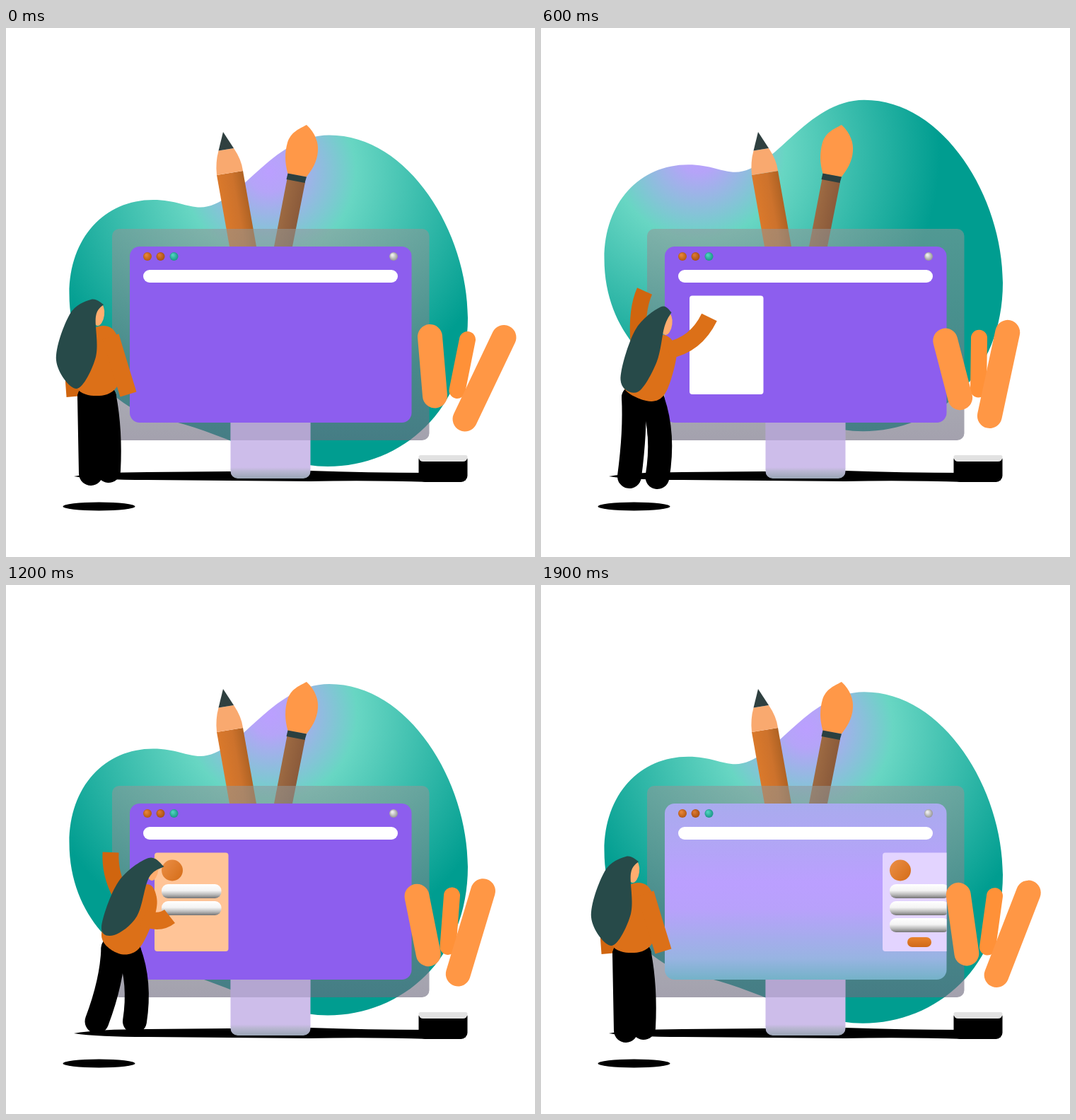
An HTML page with a canvas that plays this animation: 748x748 px, repeating every 2000 ms.

```html
<!DOCTYPE html>
<html lang="en">
<head>
<meta charset="utf-8">
<title>Building a page</title>
<style>
  html, body { margin: 0; width: 100%; height: 100%; overflow: hidden; background: #fff; }
  canvas { display: block; width: 100vw; height: 100vh; }
</style>
</head>
<body>
<canvas id="stage" width="748" height="748"></canvas>
<script>
const ctx = document.getElementById('stage').getContext('2d');
const LOOP = 2000, STEP = 100;

// Body poses: flat x,y lists
const stand = {
  hair: [138,391, 127,408, 127,465, 100,510, 71,470, 90,405, 120,384],
  body: [125,424, 150,425, 162,455, 158,505, 132,520, 100,508, 100,450],
  face: [131,405], back: [97,440, 93,480, 97,521], front: [148,436, 158,470, 173,518],
  legA: [118,522, 119,570, 120,630], legB: [139,522, 148,570, 145,626]
};
const reach = {
  hair: [187,420, 175,440, 163,485, 136,526, 111,507, 133,443, 170,409],
  body: [165,448, 184,454, 190,480, 172,530, 145,538, 111,510, 140,460],
  face: [177,434], back: [148,390, 135,410, 138,460], front: [176,463, 222,456, 243,415],
  legA: [127,528, 146,580, 130,641], legB: [156,535, 182,580, 171,641]
};
const lift = {
  hair: [182,384, 174,405, 164,460, 138,503, 114,488, 133,412, 168,380],
  body: [170,420, 187,429, 193,450, 178,505, 152,516, 120,498, 135,440],
  face: [178,402], back: [145,354, 134,388, 138,428], front: [184,448, 216,440, 233,403],
  legA: [135,517, 121,560, 120,627], legB: [160,519, 167,570, 158,629]
};
const place = {
  hair: [216,394, 197,410, 180,467, 150,496, 134,486, 158,418, 198,383],
  body: [195,425, 208,438, 206,468, 186,515, 158,521, 135,497, 155,445],
  face: [203,402], back: [146,370, 143,405, 159,437], front: [196,474, 221,468, 223,433],
  legA: [151,514, 150,560, 129,617], legB: [174,518, 189,560, 181,617]
};
const lower = {
  hair: [231,402, 207,418, 190,470, 156,494, 136,481, 160,421, 205,389],
  body: [200,422, 216,437, 215,465, 190,513, 160,521, 135,495, 155,445],
  face: [212,402], back: [150,386, 150,412, 164,436], front: [192,467, 213,492, 240,504],
  legA: [152,514, 150,560, 128,617], legB: [174,518, 192,565, 183,617]
};
const lean = {
  hair: [214,388, 199,410, 187,467, 158,499, 141,485, 157,417, 195,381],
  body: [195,420, 213,437, 212,468, 195,512, 163,521, 135,495, 145,440],
  face: [205,403], back: [150,386, 150,412, 160,436], front: [201,470, 205,490, 202,518],
  legA: [151,514, 142,560, 138,615], legB: [169,518, 171,560, 168,615]
};
const poses = [[0, stand], [100, stand], [400, reach], [800, lift], [1000, place],
  [1400, lower], [1600, lean], [1800, stand], [2000, stand]];

// Blob lift, and the gradient centre that drifts inside it
const lifts = [[0,0], [100,-6], [200,-20], [300,-36], [400,-45.5], [500,-49.5], [700,-50], [800,-46.5],
  [900,-36], [1000,-23.5], [1200,-11.5], [1400,-4.5], [1600,-1.8], [1800,-.5], [2000,0]];
const glowX = [[0,372], [400,226], [600,222], [800,246], [1000,318], [1400,430], [1600,400], [1900,375], [2000,372]];
const glowY = [[0,203], [400,176], [800,176], [1000,188], [1400,178], [1600,190], [1900,202], [2000,203]];

const lerp = (a, b, k) => a + (b - a) * k;
const mix = (a, b, k) => a.map((v, i) => lerp(v, b[i], k));

function span(keys, t) {
  let i = 1;
  while (i < keys.length - 1 && keys[i][0] < t) i++;
  const [t0, a] = keys[i - 1], [t1, b] = keys[i];
  return [a, b, (t - t0) / (t1 - t0)];
}
const at = (keys, t) => lerp(...span(keys, t));

function fill(style, path) {
  ctx.fillStyle = style;
  path ? ctx.fill(path) : ctx.fill();
}
function linear(x0, y0, x1, y1, ...stops) {
  const g = ctx.createLinearGradient(x0, y0, x1, y1);
  stops.forEach(([p, c]) => g.addColorStop(p, c));
  return g;
}
function box(x, y, w, h, r, style) {
  ctx.beginPath();
  ctx.roundRect(x, y, w, h, r);
  fill(style);
}
function oval(x, y, rx, ry, style, turn = 0) {
  ctx.beginPath();
  ctx.ellipse(x, y, rx, ry, turn, 0, 7);
  fill(style);
}
function poly(pts, style) {
  ctx.beginPath();
  for (let i = 0; i < pts.length; i += 2) ctx.lineTo(pts[i], pts[i + 1]);
  ctx.closePath();
  fill(style);
}
function ball(x, y, r, light, dark) {
  const g = ctx.createRadialGradient(x - r * .3, y - r * .35, r * .2, x, y, r * 1.1);
  g.addColorStop(0, light);
  g.addColorStop(1, dark);
  oval(x, y, r, r, g);
}
function limb(p, width, color, cap) {
  ctx.beginPath();
  ctx.moveTo(p[0], p[1]);
  if (p.length > 4) ctx.quadraticCurveTo(p[2], p[3], p[4], p[5]);
  else ctx.lineTo(p[2], p[3]);
  ctx.lineWidth = width;
  ctx.lineCap = cap;
  ctx.strokeStyle = color;
  ctx.stroke();
}
// Catmull-Rom outline; a sharp one has a corner at its first point
function outline(flat, sharp, style) {
  const n = flat.length / 2;
  const pt = i => {
    if (sharp) i = Math.max(0, Math.min(n, i));
    i = (i + n) % n;
    return [flat[2 * i], flat[2 * i + 1]];
  };
  ctx.beginPath();
  ctx.moveTo(...pt(0));
  for (let i = 0; i < n; i++) {
    const [a, b, c, d] = [pt(i - 1), pt(i), pt(i + 1), pt(i + 2)];
    ctx.bezierCurveTo(b[0] + (c[0] - a[0]) / 6, b[1] + (c[1] - a[1]) / 6,
      c[0] - (d[0] - b[0]) / 6, c[1] - (d[1] - b[1]) / 6, c[0], c[1]);
  }
  fill(style);
}

const blob = new Path2D('M89.5 376C89.5 296 140 243 208 243C240 243 255 253.5 275 253.5' +
  'C330 253.5 375 151.5 457 151.5C570 151.5 653 290 653 410C653 540 560 620 455 620' +
  'C380 620 300 568 222 553C165 545 89.5 482 89.5 376Z');
const floor = new Path2D('M96 634Q130 628 200 628L430 626Q510 629 600 629V642Q510 639 430 641L200 639Q130 639 96 634Z');
const wood = new Path2D('M300.5 173.5L322 170Q333 186 335 202L298 208Q296 190 300.5 173.5Z');
const bristle = new Path2D('M425 137C438 149 442 163 441 174C440 190 432 201 425 210.5L398.5 206' +
  'C394 190 394 176 398 162C403 147 414 143 425 137Z');
const peaks = new Path2D('M403 485Q400 485 401 482L423 418Q426 412 429 418L444 453L451 444Q454 440 456 445L471 482Q471 485 468 485Z');

function drawBlob(t) {
  const dy = at(lifts, t), x = at(glowX, t), y = at(glowY, t) - dy;
  const g = ctx.createRadialGradient(x, y, 0, x, y, 360);
  g.addColorStop(0, '#bb9fff');
  g.addColorStop(.08, '#b5a4f8');
  g.addColorStop(.34, '#68d6c3');
  g.addColorStop(.95, '#009d90');
  ctx.save();
  ctx.translate(0, dy);
  fill(g, blob);
  ctx.restore();
}

function drawTools() {
  poly([298,208, 335,202, 354,309, 316,309],
    linear(304, 260, 348, 252, [0, '#dc7a2b'], [.55, '#cd722c'], [1, '#a85f22']));
  fill('#f9a96f', wood);
  poly([307,147, 322,170, 300.5,173.5], '#2f4040');
  poly([397.5,213, 423,218, 405,309, 379,309], linear(388, 260, 416, 266, [0, '#9d6a42'], [1, '#89593a']));
  fill('#ff9848', bristle);
  poly([398.5,205.5, 425,210.5, 422.5,219, 396.5,214], '#2b4040');
}

function drawCard(t, themed) {
  if (t < 300) return;
  box(210, 378.5, 104.5, 139.5, 4, t < 700 ? '#fff' : themed ? '#e3d4ff' : '#ffc497');
  if (t >= 1000) oval(235, 403.5, 15, 15, linear(223, 395, 246, 412, [0, '#e88a40'], [1, '#d8721f']));
  for (let i = 0; i < 3; i++) {
    if (t < 1100 + i * 100) return;
    const y = 423 + i * 24;
    box(220, y, 84.5, 20, 9, linear(0, y, 0, y + 20, [0, '#fff'], [.45, '#f4f4f4'], [.75, '#b8b8b8'], [1, '#747474']));
  }
  if (t >= 1400) box(245, 498, 34, 14, 7, linear(0, 498, 0, 512, [0, '#e8822c'], [1, '#cf6918']));
}

function drawPanel() {
  box(349, 378.5, 185, 139.5, 3, linear(349, 0, 534, 0, [0, '#8465cf'], [.035, '#a783f0'], [1, '#a985f3']));
  [['#dc7018', 508.5], ['#c9611a', 516.5], ['#2fb5a0', 524]].forEach(([c, x]) => oval(x, 389.5, 2.5, 2.5, c));
  box(427, 426, 38, 36, 3, '#8d5eee');
  oval(448.5, 420, 14, 14, '#d8701c');
  fill('#b3560f', peaks);
}

function drawScreen(t) {
  const themed = t >= 1600;
  box(150, 284, 448.5, 299, 10,
    linear(0, 284, 0, 583, [0, 'rgba(145,150,150,.56)'], [.4, 'rgba(125,135,140,.58)'], [1, 'rgba(110,106,126,.63)']));
  ctx.save();
  ctx.beginPath();
  ctx.roundRect(175, 309, 398.5, 249, 14);
  fill(themed ? linear(0, 309, 0, 558, [0, '#a9abee'], [.22, '#b1a6f5'], [.45, '#bb9fff'], [.6, '#b8a1fb'],
    [.88, '#98b4e2'], [1, '#74b2c8']) : '#8d5eee');
  ctx.clip();
  ball(200, 323, 6, '#e58336', '#b2560f');
  ball(218.5, 323, 6, '#d9752e', '#a34e10');
  ball(237.5, 323, 6, '#4cd0bc', '#169181');
  ball(548, 323, 6, '#ececec', '#8f8f8f');
  box(194, 342, 360, 18, 9, '#fff');
  // The content speeds up as it leaves to the right
  const slide = themed ? 273 * ((t - 1600) / 300) ** 2 : 0;
  ctx.translate(slide, 0);
  drawCard(t, themed);
  if (t >= 1500) drawPanel();
  ctx.restore();
}

function drawStand() {
  box(317.5, 558, 113, 79, [0, 0, 10, 10],
    linear(0, 558, 0, 637, [0, '#cdbdea'], [.8, '#cdbdea'], [.87, '#b9b6d2'], [1, '#9aa5b5']));
  box(317.5, 558, 113, 25, 0, 'rgba(110,104,140,.27)');
}

function drawLeaves(t) {
  // Each swing falls slowly for two thirds, then returns
  const u = t < 800 ? t / 800 : (t - 800) / 1200;
  const s = u < 2 / 3 ? u * 1.5 : (1 - u) * 3;
  limb(mix([652.5,440.5, 638,512.5], [608.5,437.5, 612,510.5], s), 23, '#ff9138', 'round');
  limb(mix([599.5,436.5, 606.5,520], [562.5,444, 588,523.5], s), 35, '#ff9745', 'round');
  limb(mix([704,437.5, 649,553], [645,428, 629.5,547], s), 35, '#ff9745', 'round');
}

function drawPot() {
  box(583.5, 607, 69, 35, [3, 3, 9, 9], '#000');
  box(583.5, 604, 69, 9, [3, 3, 7, 7], '#e2e2e2');
}

function drawWoman(t) {
  const [a, b, k] = span(poses, t), p = {};
  for (const part in a) p[part] = mix(a[part], b[part], k);
  limb(p.back, 23, '#d0650f', 'butt');
  limb([...p.legA.slice(0, 2), ...p.legB.slice(0, 2)], 34, '#000', 'round');
  limb(p.legA, 34, '#000', 'round');
  limb(p.legB, 34, '#000', 'round');
  outline(p.body, false, '#dc7018');
  limb(p.front, 24, '#dc7018', 'butt');
  oval(...p.face, 8, 16, '#ffad6f', .12);
  outline(p.hair, true, '#274a49');
}

function draw() {
  const t = Math.floor((performance.now() + 4) / STEP) * STEP % LOOP;
  ctx.fillStyle = '#fff';
  ctx.fillRect(0, 0, 748, 748);
  drawBlob(t);
  drawTools();
  fill('#000', floor);
  oval(131.5, 676.5, 51, 6, '#000');
  drawScreen(t);
  drawStand();
  drawPot();
  drawLeaves(t);
  drawWoman(t);
  requestAnimationFrame(draw);
}
draw();
</script>
</body>
</html>
```
